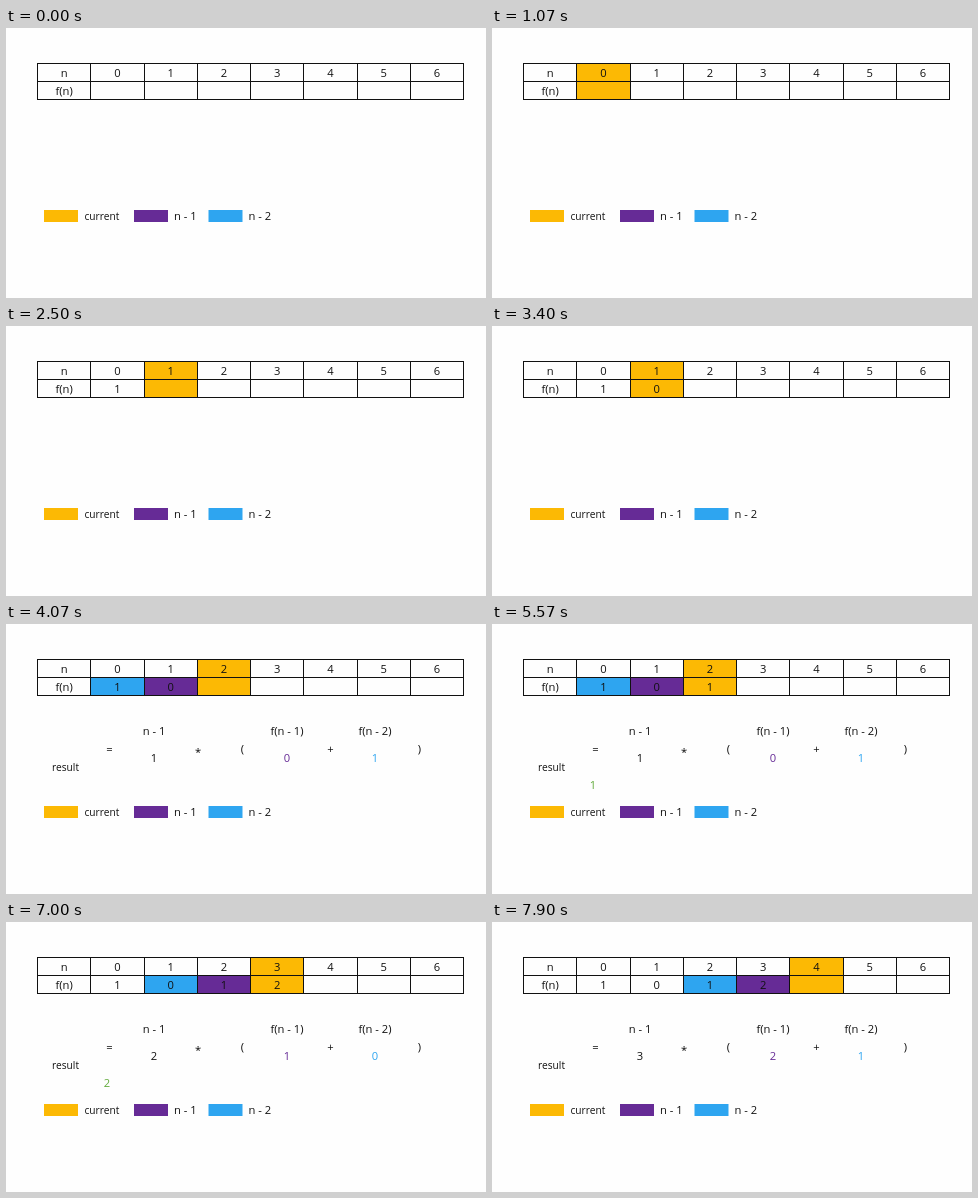
An HTML page with a canvas that plays this animation: 480 px wide and 270 px high, repeating every 8 s.

```html
<!DOCTYPE html>
<html lang="en">
<head>
<meta charset="utf-8">
<title>Recurrence table</title>
<style>
html, body { margin: 0; width: 100%; height: 100%; overflow: hidden; background: #fefefe; }
canvas { display: block; width: 480px; height: 270px; }
</style>
</head>
<body>
<canvas id="stage" width="480" height="270"></canvas>
<script>
const ctx = document.getElementById('stage').getContext('2d');
const LOOP = 8000;
const ORANGE = '#fcb904', PURPLE = '#662b96', BLUE = '#2ea5f0', GREEN = '#62ab3c', INK = '#111';
const LEFT = 31, TOP = 35, COL = 53.25, ROW = 18, COLS = 8;
const FORMULA = 11.2, WORD = 10.2;

// When each column becomes current, its sum appears, and its cell is filled
const steps = [
  { start: 600, fill: 1270 },
  { start: 2070, fill: 2630 },
  { start: 3730, sum: 4400, fill: 4930 },
  { start: 5730, sum: 6400, fill: 6900 },
  { start: 7730, sum: Infinity, fill: Infinity }
];

const values = [1, 0];
for (let n = 2; n < steps.length; n++) {
  values[n] = (n - 1) * (values[n - 1] + values[n - 2]);
}

const colX = c => Math.round(LEFT + c * COL);
const midX = c => LEFT + (c + 0.5) * COL + 0.5;

function label(text, x, y, { color = INK, size = FORMULA, align = 'center' } = {}) {
  ctx.font = `${size}px "Open Sans", "Noto Sans", sans-serif`;
  ctx.textAlign = align;
  ctx.fillStyle = color;
  ctx.fillText(text, x, y + 4);
}

function box(color, x, y, w, h) {
  ctx.fillStyle = color;
  ctx.fillRect(x, y, w, h);
}

function shade(n, color, row, rows) {
  const x = colX(n + 1);
  box(color, x, TOP + row * ROW, colX(n + 2) - x, rows * ROW);
}

function drawTable(t, n) {
  if (n >= 0) shade(n, ORANGE, 0, 2);
  if (n >= 2) {
    shade(n - 1, PURPLE, 1, 1);
    shade(n - 2, BLUE, 1, 1);
  }
  for (let r = 0; r <= 2; r++) box(INK, LEFT, TOP + r * ROW, COLS * COL + 1, 1);
  for (let c = 0; c <= COLS; c++) box(INK, colX(c), TOP, 1, 2 * ROW + 1);

  label('n', midX(0), 45);
  label('f(n)', midX(0), 63);
  for (let c = 0; c < COLS - 1; c++) {
    label(c, midX(c + 1), 45);
    if (steps[c] && t >= steps[c].fill) label(values[c], midX(c + 1), 63);
  }
}

function drawFormula(t, n) {
  label('result', 59.5, 143, { size: WORD });
  label('=', 103.5, 125);
  label('n - 1', 148, 107);
  label(n - 1, 148, 134);
  label('*', 192, 128);
  label('(', 236.5, 125);
  label('f(n - 1)', 281, 107);
  label(values[n - 1], 281, 134, { color: PURPLE });
  label('+', 324.5, 125);
  label('f(n - 2)', 369, 107);
  label(values[n - 2], 369, 134, { color: BLUE });
  label(')', 413.5, 125);
  if (t >= steps[n].sum) label(values[n], 101, 161, { color: GREEN });
}

function drawLegend() {
  const items = [
    [ORANGE, 38, 'current', 78.5, WORD],
    [PURPLE, 128, 'n - 1', 168, FORMULA],
    [BLUE, 202.5, 'n - 2', 242.5, FORMULA]
  ];
  for (const [color, x, text, textX, size] of items) {
    box(color, x, 182, 34, 12);
    label(text, textX, 188, { size, align: 'left' });
  }
}

function draw(t) {
  box('#fefefe', 0, 0, 480, 270);
  const n = steps.filter(s => t >= s.start).length - 1;
  drawTable(t, n);
  if (n >= 2) drawFormula(t, n);
  drawLegend();
}

const begin = performance.now();
function frame() {
  draw((performance.now() - begin) % LOOP);
  requestAnimationFrame(frame);
}
frame();
</script>
</body>
</html>
```
